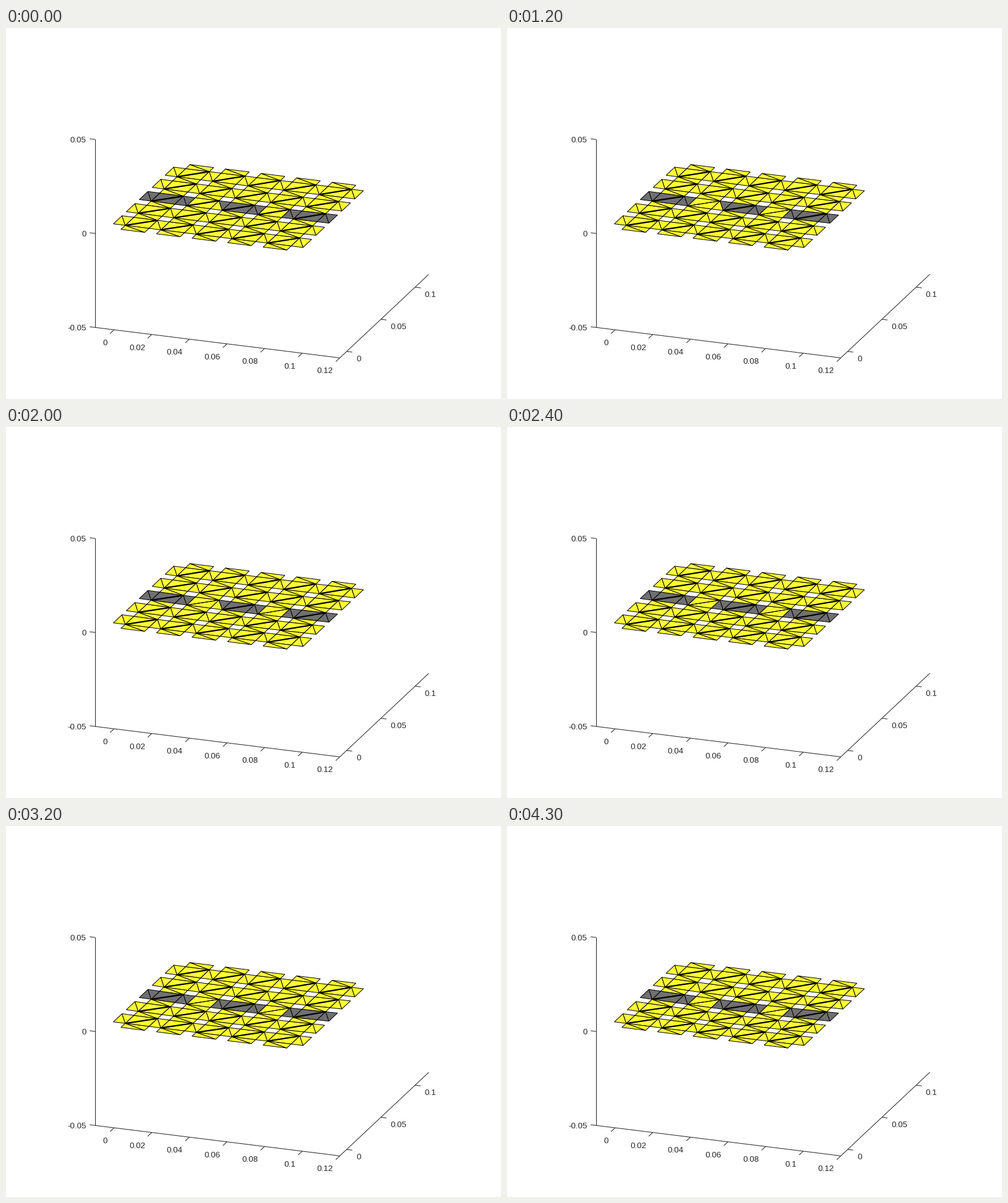
A matplotlib script for the animation above (4400 ms loop, 800x600 px).

```python
import numpy as np
import matplotlib.pyplot as plt
from matplotlib.animation import FuncAnimation
from matplotlib.collections import LineCollection, PolyCollection

W, H, DPI = 800, 600, 100
PX = 72 / DPI
FRAMES, STEP, HOLD = 44, 100, 4

N = 5
SIDE, GAP = 0.0126, 0.0063
PITCH = SIDE + GAP
SPAN = N * PITCH + GAP
LO = -0.01
DIP, DIP_GROWTH = 0.00025, 0.0005

VIEW = np.radians(20)
SCALE = 3235
C, S = np.cos(VIEW), np.sin(VIEW)

YELLOW, GRAY, INK = "#ffff33", "#707070", "#262626"
MID = N // 2


def project(p):
    """Orthographic view, azimuth 20 and elevation 20 degrees."""
    x, y, z = np.moveaxis(np.asarray(p, float), -1, 0)
    x, y = x - LO, y - LO
    u = 144.3 + SCALE * (C * x + S * y)
    v = 332.3 + SCALE * (S * S * x - S * C * y - C * z)
    return np.stack([u, v], -1)


def corners(x, y, w, h):
    """Bottom left, bottom right, top right, top left."""
    return [(x, y), (x + w, y), (x + w, y + h), (x, y + h)]


tris, colors, folds, active = [], [], [], []


def add_joint(x, y, w, h, color):
    bl, br, tr, tl = corners(x, y, w, h)
    tris.extend([(bl, br, tl), (br, tr, tl)])
    colors.extend([color, color])


for r in range(N - 1, -1, -1):
    y = GAP + r * PITCH
    for c in range(N):
        x = c * PITCH
        dark = r == MID and c % 2 == 0
        bl, br, tr, tl = corners(x, y, SIDE, SIDE)
        tris.extend([(bl, br, tr), (bl, tr, tl)])
        colors.extend([GRAY if dark else YELLOW] * 2)
        folds.append((bl, tr))
        active.append(r == MID and c % 2 == 1)
        add_joint(x, y + SIDE, SIDE, GAP, YELLOW)
        if r == 0:
            add_joint(x, y - GAP, SIDE, GAP, YELLOW)
    for c in range(N + 1):
        if r == MID and c == MID:
            late = len(tris)  # joint triangle that turns gray later on
        add_joint(c * PITCH - GAP, y, GAP, SIDE, GRAY if r == MID else YELLOW)

tris, folds, active = np.array(tris), np.array(folds), np.array(active)


def sag(xy, amount):
    """Dip of the sheet, deepest in the middle and zero along its rim."""
    u = (xy[..., 0] + GAP) / SPAN
    v = xy[..., 1] / SPAN
    depth = DIP + DIP_GROWTH * amount
    z = -depth * np.sin(np.pi * u) * np.sin(np.pi * v)
    return project(np.concatenate([xy, z[..., None]], -1))


fig = plt.figure(figsize=(W / DPI, H / DPI), dpi=DPI, facecolor="white")
ax = fig.add_axes([0, 0, 1, 1])
ax.set_xlim(0, W)
ax.set_ylim(H, 0)
ax.axis("off")


def line(a, b):
    ax.plot([a[0], b[0]], [a[1], b[1]], color=INK, lw=PX, solid_capstyle="butt")


def tick(at, step, text, pos, ha):
    line(at, at + np.array(step))
    ax.text(*pos, text, family="Liberation Sans", size=13.33 * PX,
            color=INK, ha=ha, va="center_baseline")


hi = LO + 0.13
line(project((LO, LO, 0.05)), project((LO, LO, -0.05)))
line(project((LO, LO, -0.05)), project((hi, LO, -0.05)))
line(project((hi, LO, -0.05)), project((hi, hi, -0.05)))

for z in (0.05, 0, -0.05):
    at = project((LO, LO, z))
    tick(at, (-9, -1.1), f"{z:g}", (129.5, at[1]), "right")
for i in range(7):
    at = project((0.02 * i, LO, -0.05))
    tick(at, (-6.5, 6.1), f"{0.02 * i:.2g}", at + (-10.5, 20.5), "right")
for y in (0, 0.05, 0.1):
    at = project((hi, y, -0.05))
    tick(at, (9, 1.1), f"{y:g}", at + (15.5, 11), "left")

faces = PolyCollection(sag(tris, 0), facecolors=colors, edgecolors="black",
                       linewidths=PX, joinstyle="round", zorder=3)
creases = LineCollection(sag(folds, 0), colors="black", zorder=4)
ax.add_collection(faces)
ax.add_collection(creases)


def update(i):
    k = max(0, i - HOLD)
    amount = k / (FRAMES - 1 - HOLD)
    faces.set_verts(sag(tris, amount))
    shades = list(colors)
    shades[late] = GRAY if k >= 20 else YELLOW
    faces.set_facecolor(shades)
    creases.set_segments(sag(folds, amount))
    thin = 2.2 - 1.4 * min(1, k / 6)
    creases.set_linewidths(np.where(active, thin, 2.2) * PX)
    return faces, creases


anim = FuncAnimation(fig, update, frames=FRAMES, interval=STEP,
                     repeat=True, repeat_delay=0, blit=False)
plt.show()
```
